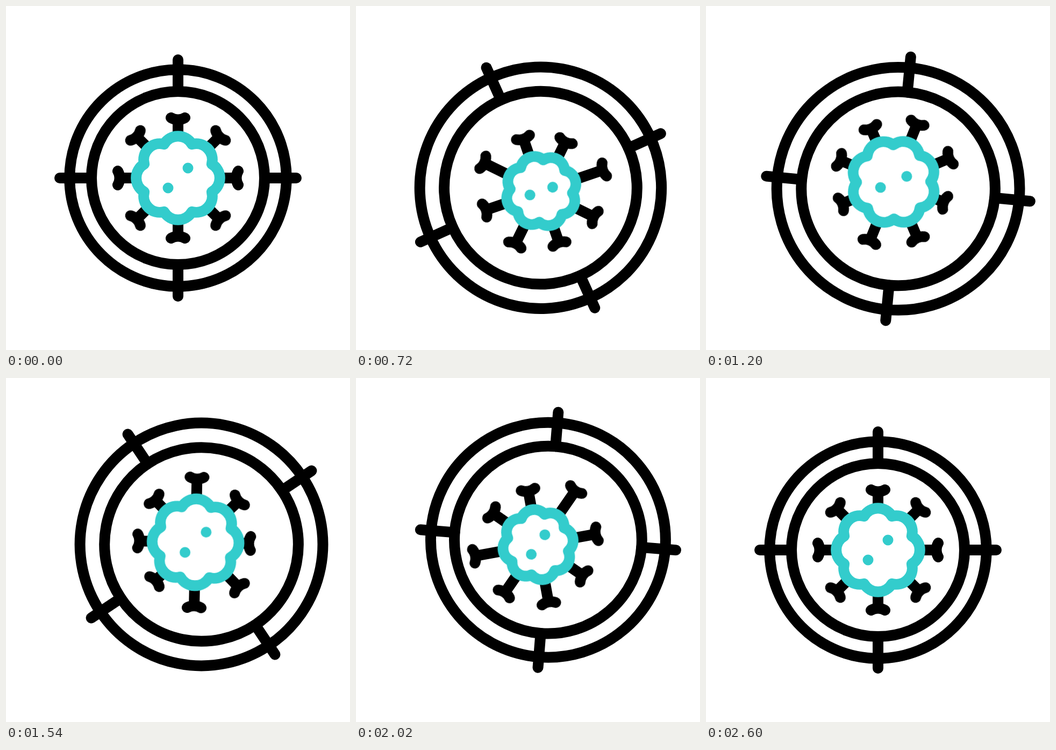
These frames come from a looping animation (640 by 640 pixels, 3000 ms). An HTML page:

```html
<!DOCTYPE html>
<html lang="en">
<head>
<meta charset="utf-8">
<title>Virus in the crosshair</title>
<style>
  html, body { margin: 0; width: 100%; height: 100%; overflow: hidden; background: #fff; }
  svg { display: block; width: 640px; height: 640px; }

  path, circle {
    fill: none;
    stroke: #000;
    stroke-width: 20px;
    stroke-linecap: round;
    stroke-linejoin: round;
    vector-effect: non-scaling-stroke;
  }
  .virus .skin { fill: #fff; stroke: #3cc; }
  .virus .eyes { stroke: #3cc; }

  .scope, .virus, .body, .spikes use {
    animation: 3s cubic-bezier(.3333, 0, .6667, 1) infinite;
    transform-origin: 0 0;
  }
  .scope { animation-name: scope-move, scope-turn, scope-size; }
  .virus { animation-name: virus-move, virus-turn; }
  .body { animation-name: pulse; }
  .spikes use { animation-name: spike; }

  @keyframes scope-move {
    0%, 10%       { translate: 0 0; }
    33.333%       { translate: 36px 28px; }
    60%           { translate: 46px -23.1px; }
    86.667%, 100% { translate: 0 0; }
  }
  @keyframes scope-turn {
    0%, 6.667%    { rotate: 0deg; }
    30%           { rotate: -29deg; }
    53.333%       { rotate: 58deg; }
    73.333%       { rotate: -10deg; }
    86.667%, 100% { rotate: 0deg; }
  }
  @keyframes scope-size {
    0%, 6.667%   { scale: 1; }
    26.667%, 60% { scale: 1.12; }
    80%, 100%    { scale: 1; }
  }
  @keyframes virus-move {
    0%, 6.667% { translate: 0 0; }
    26.667%    { translate: 26px 25.5px; }
    56.667%    { translate: 33.3px -18px; }
    80%, 100%  { translate: 0 0; }
  }
  @keyframes virus-turn {
    0%, 6.667%    { rotate: 0deg; }
    30%           { rotate: 31.2deg; }
    63.333%       { rotate: -11.2deg; }
    86.667%, 100% { rotate: 0deg; }
  }
  @keyframes pulse {
    0%, 6.667%       { scale: 1; }
    26.667%, 66.667% { scale: .846; }
    46.667%          { scale: 1.07; }
    86.667%, 100%    { scale: 1; }
  }
  /* --a and --b: how far a spike reaches out at the two ends of the pulse */
  @keyframes spike {
    0%, 6.667%       { transform: rotate(var(--r)) translateY(-112px); }
    26.667%, 66.667% { transform: rotate(var(--r)) translateY(calc(-112px - var(--a))); }
    46.667%          { transform: rotate(var(--r)) translateY(calc(-112px - var(--b))); }
    86.667%, 100%    { transform: rotate(var(--r)) translateY(-112px); }
  }
</style>
</head>
<body>
<svg viewBox="0 0 640 640">
  <defs>
    <path id="spike" d="M-13 0Q0 7 13 0M0 4V52"/>
  </defs>
  <g transform="translate(320 320)">
    <g class="scope">
      <circle r="201.7"/>
      <circle r="161"/>
      <path d="M0-220V-161M220 0H161M0 220V161M-220 0H-161"/>
    </g>
    <g class="virus">
      <g class="spikes">
        <use href="#spike" style="--r:0deg; --a:-7.8px; --b:11.9px"/>
        <use href="#spike" style="--r:45deg; --a:12.6px; --b:0px"/>
        <use href="#spike" style="--r:90deg; --a:-.3px; --b:-11.2px"/>
        <use href="#spike" style="--r:135deg; --a:-8px; --b:8.5px"/>
        <use href="#spike" style="--r:180deg; --a:-.1px; --b:11.4px"/>
        <use href="#spike" style="--r:225deg; --a:-.2px; --b:-7px"/>
        <use href="#spike" style="--r:270deg; --a:9.8px; --b:-6.5px"/>
        <use href="#spike" style="--r:315deg; --a:-6.8px; --b:.7px"/>
      </g>
      <g class="body">
        <path class="skin" d="M-26-62.8A30 30 0 0 1 26-62.8A30 30 0 0 1 62.8-26A30 30 0 0 1 62.8 26A30 30 0 0 1 26 62.8A30 30 0 0 1-26 62.8A30 30 0 0 1-62.8 26A30 30 0 0 1-62.8-26A30 30 0 0 1-26-62.8Z"/>
        <path class="eyes" d="M18.5-18.5h.01M-18.5 18.5h.01"/>
      </g>
    </g>
  </g>
</svg>
</body>
</html>
```
